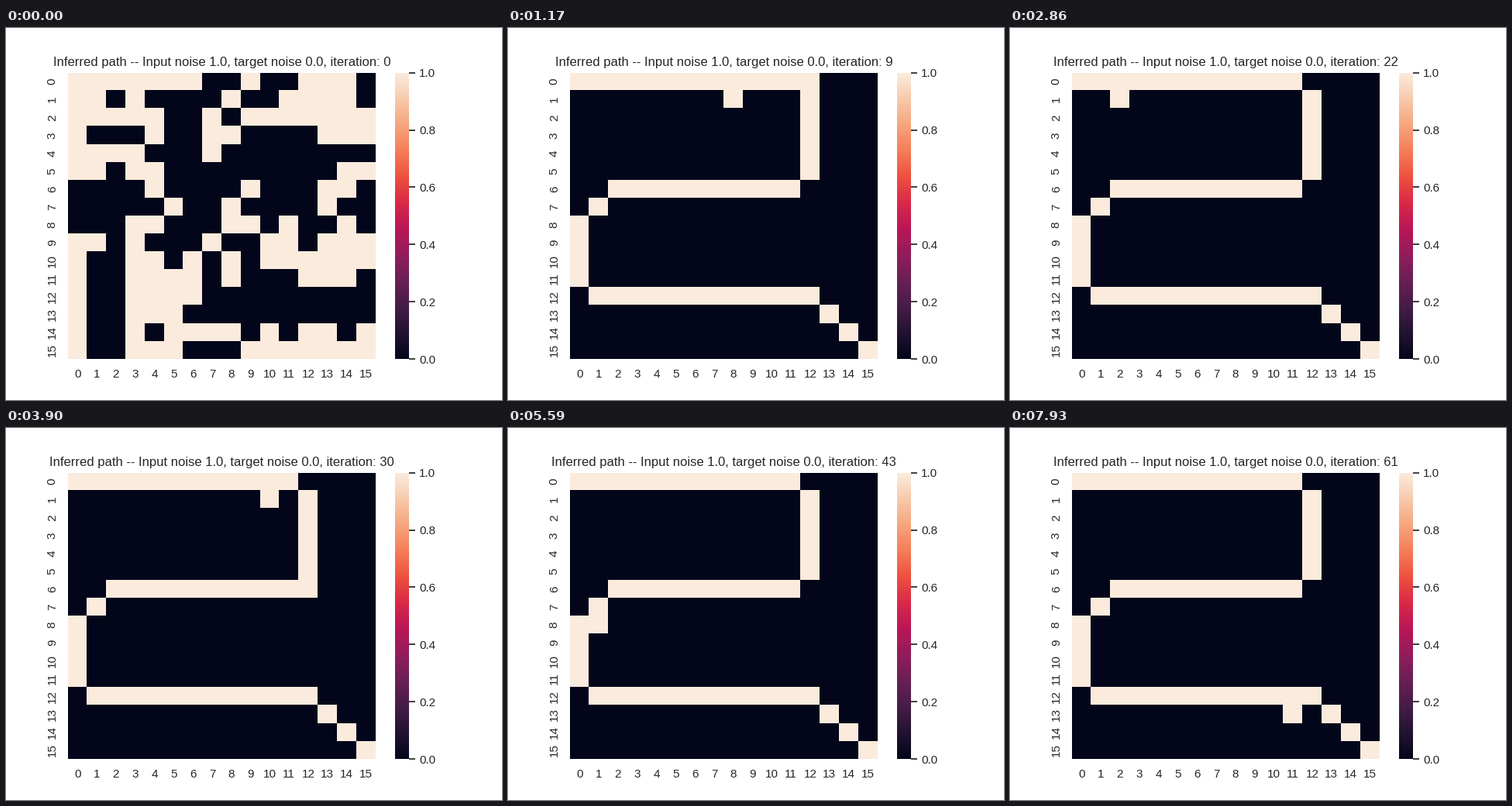
A matplotlib script for the animation above (8 s loop, 640 by 480 pixels).

```python
import numpy as np
import matplotlib.pyplot as plt
from matplotlib.animation import FuncAnimation
from matplotlib.colors import LinearSegmentedColormap

N = 16
LOOP, TICK, STEP = 8000, 50, 130
INK = "0.15"

plt.rcParams.update({
    "font.family": "Liberation Sans",
    "text.color": INK, "xtick.color": INK, "ytick.color": INK,
    "xtick.labelsize": 11, "ytick.labelsize": 11, "axes.titlesize": 12,
    "xtick.major.size": 6, "ytick.major.size": 6,
    "xtick.major.width": 1.25, "ytick.major.width": 1.25,
})

ROCKET = LinearSegmentedColormap.from_list("rocket", [
    "#03051a", "#221331", "#451c47", "#691f55", "#921c5b", "#b91657",
    "#d92847", "#ed503e", "#f47d57", "#f6a47c", "#f7c9aa", "#faebdd"])

# Corners (row, col) of the settled path
CORNERS = [(0, 0), (0, 11), (1, 12), (5, 12), (6, 11), (6, 2),
           (8, 0), (11, 0), (12, 1), (12, 12), (15, 15)]

# Large areas of the untrained guess: row, col, height, width
DARK = [(1, 5, 6, 2), (10, 1, 5, 2), (12, 7, 2, 8), (4, 10, 4, 3), (6, 0, 2, 3)]
LIT = [(0, 0, 3, 2), (0, 0, 1, 7), (9, 0, 7, 1), (11, 3, 3, 3), (2, 10, 1, 6)]


def walk(corners):
    """All cells passed when stepping from corner to corner."""
    cells = [corners[0]]
    for (r0, c0), (r1, c1) in zip(corners, corners[1:]):
        n = max(abs(r1 - r0), abs(c1 - c0))
        cells += [(r0 + (r1 - r0) * k // n, c0 + (c1 - c0) * k // n)
                  for k in range(1, n + 1)]
    return cells


def untrained():
    grid = np.random.default_rng(4).integers(0, 2, (N, N)).astype(float)
    for value, blocks in enumerate((DARK, LIT)):
        for r, c, h, w in blocks:
            grid[r:r + h, c:c + w] = value
    return grid


TRAIL = walk(CORNERS)
PATH = np.zeros((N, N))
PATH[tuple(zip(*TRAIL))] = 1
GUESS = untrained()


def infer(it):
    """The guess fades into the path, which keeps sprouting a few stray cells."""
    rng = np.random.default_rng(it)
    grid = np.where(rng.random((N, N)) < np.exp(-it / 2), GUESS, PATH)
    for _ in range(rng.poisson(1.2 * (1 - np.exp(-it)))):
        r, c = TRAIL[rng.integers(len(TRAIL) - 3)]
        dr, dc = rng.integers(-1, 2, 2)
        grid[abs(r + dr), abs(c + dc)] = 1
    return grid


# Inner cell borders round down to whole pixels
edges = np.arange(N + 1.0)
edges[1:-1] -= 0.02

fig, ax = plt.subplots(figsize=(6.4, 4.8), dpi=100)
mesh = ax.pcolormesh(edges, edges, GUESS, cmap=ROCKET, vmin=0, vmax=1)
ax.set(xlim=(0, N), ylim=(N, 0))
ax.spines[:].set_visible(False)
ax.set_xticks(np.arange(N) + 0.5, range(N))
ax.set_yticks(np.arange(N) + 0.5, range(N), rotation=90, va="center")
ax.tick_params(bottom=False, left=False)
bar = fig.colorbar(mesh, ax=ax)
bar.outline.set_linewidth(0)
title = ax.set_title("")


def draw(i):
    it = (i * TICK + TICK - 10) // STEP
    mesh.set_array(infer(it))
    title.set_text(f"Inferred path -- Input noise 1.0, target noise 0.0, iteration: {it}")
    return mesh, title


anim = FuncAnimation(fig, draw, frames=LOOP // TICK, interval=TICK,
                     repeat=True, repeat_delay=0)
plt.show()
```
